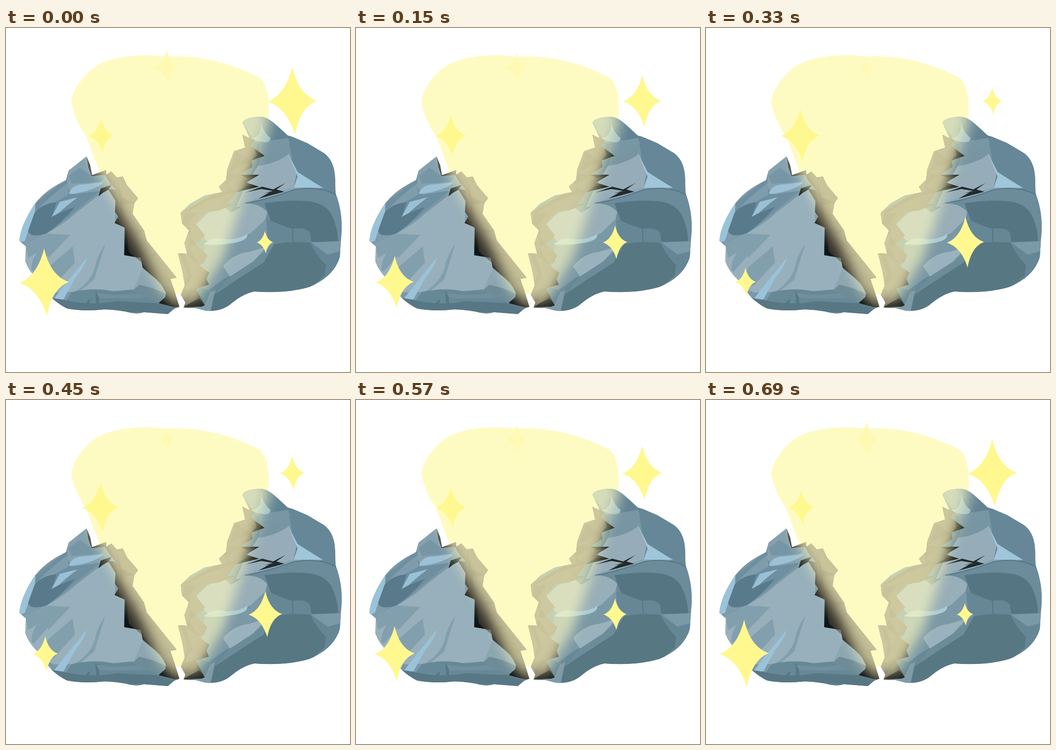
An HTML page that plays this animation: 748 by 748 pixels, repeating every 720 ms.

```html
<!DOCTYPE html>
<html lang="en">
<head>
<meta charset="utf-8">
<title>Split rock</title>
<style>
  html, body { margin: 0; height: 100%; overflow: hidden; background: #fff; }
  svg { display: block; width: 100%; height: 100%; }
</style>
</head>
<body>
<svg viewBox="0 0 748 748">
  <defs>
    <path id="left" d="M175 279 183 298 187 320 218 309 218 319 229 312 241 325 254 323 263 342 287 370 279 381 275 404 300 440 306 462 330 492 371 543 357 545 366 571 377 606 364 612 352 622 300 618Q285 624 262 617 235 612 213 612 170 617 133 610 118 603 100 588L82 566 70 548Q50 530 42 508L43 475 29 463Q31 430 62 383 85 352 130 331L136 310Z"/>
    <path id="right" d="M386 608 390 597 380 580 389 560 384 530 374 490 394 491 388 468 398 440 383 425 380 402 400 382 432 364 470 357 463 345 479 330 481 308 496 268 520 260 514 232 530 240 514 206Q520 194 552 193 570 193 590 213L613 234 622 236 655 250 692 272Q717 291 716 335L717 360Q731 395 730 440L726 497Q715 540 660 563 610 578 540 573 515 578 490 599 470 617 435 615L412 609Z"/>
    <path id="star" d="M0-74Q13-15 53.5-1 17 13 6 73-12 15-53.5 1-15-14 0-74Z"/>
    <clipPath id="inLeft"><use href="#left"/></clipPath>
    <clipPath id="inRight"><use href="#right"/></clipPath>
    <clipPath id="rocks"><use href="#left"/><use href="#right"/></clipPath>
    <linearGradient id="leftCrack" gradientUnits="userSpaceOnUse" x1="262" y1="482" x2="314" y2="447">
      <stop stop-color="#0d1517"/><stop offset=".4" stop-color="#403c32"/><stop offset="1" stop-color="#6d6355"/>
    </linearGradient>
    <linearGradient id="rightCrack" gradientUnits="userSpaceOnUse" x1="450" y1="410" x2="501" y2="430">
      <stop stop-color="#776f60"/><stop offset=".5" stop-color="#6a6355"/><stop offset="1" stop-color="#1d2422"/>
    </linearGradient>
    <linearGradient id="peak" gradientUnits="userSpaceOnUse" x1="535" y1="210" x2="595" y2="228">
      <stop stop-color="#8fa6ac"/><stop offset="1" stop-color="#628393"/>
    </linearGradient>
    <filter id="soft" x="-20%" y="-20%" width="140%" height="140%"><feGaussianBlur stdDeviation="13"/></filter>
  </defs>

  <path fill="#fefbc2" d="M142 160Q145 130 180 95 215 60 310 59 350 62 352 62 450 56 553 109 574 130 571 192L540 260 380 579 366 578 300 480 203 312 174 235Q147 197 142 160Z"/>

  <g clip-path="url(#inLeft)">
    <use href="#left" fill="#7b98a8"/>
    <path fill="#6e8fa0" d="M130 330 62 383 45 440 90 448 200 357 205 340Z"/>
    <path fill="#9ac3d9" d="M64 380Q30 420 28 468L43 462 52 430 63 405Z"/>
    <path fill="#7e9cac" d="M63 405Q75 382 133 338L136 362 90 388 62 422 47 446 70 452 38 472 52 430Z"/>
    <path fill="#587a8a" d="M62 402Q80 381 110 379L100 410Q118 400 150 389 120 425 87 447 52 457 48 441Z"/>
    <path fill="#9ac0d5" d="M99 411 117 378 156 368Q132 386 115 402Z"/>
    <path fill="#98b0bc" d="M205 361 224 352 238 378 237 424 258 434 258 494 293 500 298 523 278 568 230 572 140 574 105 575 72 562 42 508 42 470 88 447Q130 423 152 402Z"/>
    <path fill="#829fae" d="M140 450 92 500 82 480 48 500 42 470 90 447ZM55 525Q55 495 85 470L110 462 88 498 60 530ZM150 510 104 560 72 562 92 520 145 475ZM148 574Q190 550 196 508 204 485 216 470 200 520 192 547L160 573Z"/>
    <path fill="#9ac2d8" d="M176 499Q171 519 151 543L125 590 103 590 132 553Z"/>
    <path fill="#668897" d="M118 610 143 574Q195 563 235 573L280 569 308 583 333 598 366 606 352 624 215 618 120 616Z"/>
    <path fill="#587784" d="M100 587 125 591Q180 605 240 594L340 599 370 606 352 625 300 618 200 618 130 614ZM167 614Q172 594 183 590L178 614ZM194 614Q197 588 194 573L202 575 203 614Z"/>
    <path fill="#718f9d" d="M196 575Q240 584 290 576L310 586Q250 590 203 587Z"/>
    <path fill="#8ca6b2" d="M298 524 338 555 348 577 332 597 276 570Z"/>
    <path fill="#6e8b97" d="M276 571 290 558 320 566 348 578 332 598Z"/>
    <path fill="#85a1af" d="M175 280 136 310 133 345 145 362 202 354 229 335 215 310 186 320Z"/>
    <path fill="#7696a6" d="M136 322 160 304 184 320 219 319 205 334 143 339Z"/>
    <path fill="#9dc1d4" d="M137 359Q144 340 170 340L213 335Q194 354 140 361Z"/>
    <path fill="url(#leftCrack)" d="M175 277 179 302 186 322 215 319 224 334 239 352 222 350 238 376 237 400 244 410 236 424 258 434 257 494 293 500 297 521 337 555 348 577 346 585 332 598 365 607 382 608 371 540 290 370 253 320 229 310 217 307 190 314Z"/>
    <path fill="#252b29" d="M201 366 206 349 230 341 222 352 211 358Z"/>
    <path fill="#473f36" opacity=".55" d="M240 325 251 368 281 380 253 385 262 434 300 440 279 452 293 492 330 492 306 506 338 540 371 544 350 555 360 600 375 604 338 560 295 510 267 486 264 440 244 415 250 390Z"/>
  </g>

  <g clip-path="url(#inRight)">
    <use href="#right" fill="#658797"/>
    <path fill="url(#peak)" d="M513 206 525 190 560 190 590 212 620 237 605 272 545 250Z"/>
    <path fill="#7896a4" d="M550 245 575 245 614 239 622 285 555 302 550 270Z"/>
    <path fill="#9fc0c9" d="M553 196Q557 225 575 239 575 253 548 246L531 240Q560 238 553 196Z"/>
    <path fill="#96adb9" d="M550 296Q590 290 614 272L632 315 625 350 545 380 500 390 515 355Z"/>
    <path fill="#7895a3" d="M556 276Q590 275 617 246L616 273Q590 294 548 300Z"/>
    <path fill="#a0c6da" d="M612 270 634 313Q665 333 690 348L625 349 634 323Z"/>
    <path fill="#89a5b3" d="M500 386Q560 365 622 347L690 347 540 380Z"/>
    <path fill="#6c8c9b" d="M520 381Q565 374 625 352 680 342 717 362L740 440 720 466 660 467 580 450Z"/>
    <path fill="none" stroke="#567582" stroke-width="2" d="M520 381Q565 374 625 352 680 342 718 363"/>
    <path fill="#567582" d="M562 381Q620 372 660 377 700 382 712 415 722 440 722 464L664 465 660 444 625 438 580 430Z"/>
    <path fill="#668796" d="M569 416Q600 430 623 437 650 432 661 445L664 467 580 468 550 445Z"/>
    <path fill="none" stroke="#567582" stroke-width="2" d="M623 435 624 466"/>
    <path fill="#98aeb8" d="M413 427 440 402 475 390 490 402 520 382Q550 380 568 400L561 430 524 451 520 468 465 480 433 460Z"/>
    <path fill="#7b98a6" d="M432 468 520 458 565 415 570 465 585 468 537 511 475 545 440 570 412 560 430 500Z"/>
    <path fill="#9ab2bd" d="M472 518Q495 490 528 487L566 476 537 508 488 542Z"/>
    <path fill="#6d8c9a" d="M486 541 537 508 582 468 620 466 540 540 445 590Z"/>
    <path fill="#577783" d="M440 616 450 582Q505 545 560 510L583 470Q620 463 662 467 676 496 696 515L693 538 660 568 575 580 540 573 500 596 470 618Z"/>
    <path fill="#7b99a7" d="M664 467 730 463 726 488 700 493Z"/>
    <path fill="#658695" d="M664 468 699 493 728 485 726 505 692 545 696 514Z"/>
    <path fill="#a9cbd2" d="M430 470Q452 452 475 459 500 462 525 448 527 463 490 468 455 474 430 470Z"/>
    <path fill="#7f9ba7" d="M384 609 432 602 444 575 455 570 445 616Z"/>
    <path fill="url(#rightCrack)" d="M510 225 526 235 540 244 532 255 562 278 534 288 536 302 509 319 551 319 522 336 550 345 500 357 481 383 497 383 462 397 435 400 413 426 433 451 412 470 438 494 430 511 419 515 442 532 436 545 441 558 413 567 423 586 432 603 380 612 370 490 378 400 460 355 478 300 495 262 520 260Z"/>
    <path fill="#554b3e" opacity=".4" d="M500 268 520 282 535 290 500 305 482 315 509 320 475 344 500 355 440 375 385 405 415 402 400 424 390 440 414 470 397 475 420 515 390 492 405 540 388 570 415 565 390 598 380 570 395 535 378 490 398 480 402 435 383 426 390 398 440 367 480 354 474 330 490 300Z"/>
    <path fill="#8ca7b3" d="M576 353 601 338 588 350 565 358Z"/>
    <path fill="#22292a" d="M520 358 557 345 581 351 608 337 588 351 605 356 549 371 572 358 590 354 560 360 580 354 555 350Z"/>
    <path fill="#202521" d="M386 607 402 597 420 588 432 603 425 606ZM534 288 562 278 541 263 545 276ZM509 319 551 319 524 326ZM500 357 550 345 523 343Z"/>
  </g>

  <g clip-path="url(#rocks)">
    <path fill="#fefbc2" opacity=".64" filter="url(#soft)" d="M165 215 196 308 292 472 335 570 365 595 418 590 472 500 573 195 545 165Z"/>
  </g>
  <g id="stars"></g>
</svg>
<script>
  const yellow = '#fff88f';
  // size = scale at loop start, mid = scale half way; drift moves the centre with scale
  const stars = [
    { x: 622.5, y: 159, size: 1, mid: .39, color: yellow },
    { x: 88, y: 553.2, size: 1, mid: .41, color: yellow, drift: -5, rise: 1 / 400 },
    { x: 562, y: 466, size: .33, mid: .755, color: yellow, drift: 3 },
    { x: 210, y: 234, size: .51, mid: .79, color: yellow, drift: -6 },
    { x: 349.5, y: 86, size: .51, mid: .28, color: '#fff9b3' }
  ];
  const group = document.getElementById('stars');
  for (const star of stars) {
    star.node = document.createElementNS('http://www.w3.org/2000/svg', 'use');
    star.node.setAttribute('href', '#star');
    star.node.setAttribute('fill', star.color);
    group.append(star.node);
  }

  const LOOP = 720, STEP = 30, SWING = 705;
  function draw() {
    const t = Math.floor(performance.now() % LOOP / STEP) * STEP;
    const u = (1 - Math.cos(2 * Math.PI * t / SWING)) / 2;
    for (const { node, x, y, size, mid, drift = 0, rise = 0 } of stars) {
      const scale = size + (mid - size) * u;
      node.setAttribute('transform', `translate(${x + drift * scale} ${y - rise * t}) scale(${scale})`);
    }
    requestAnimationFrame(draw);
  }
  draw();
</script>
</body>
</html>
```
